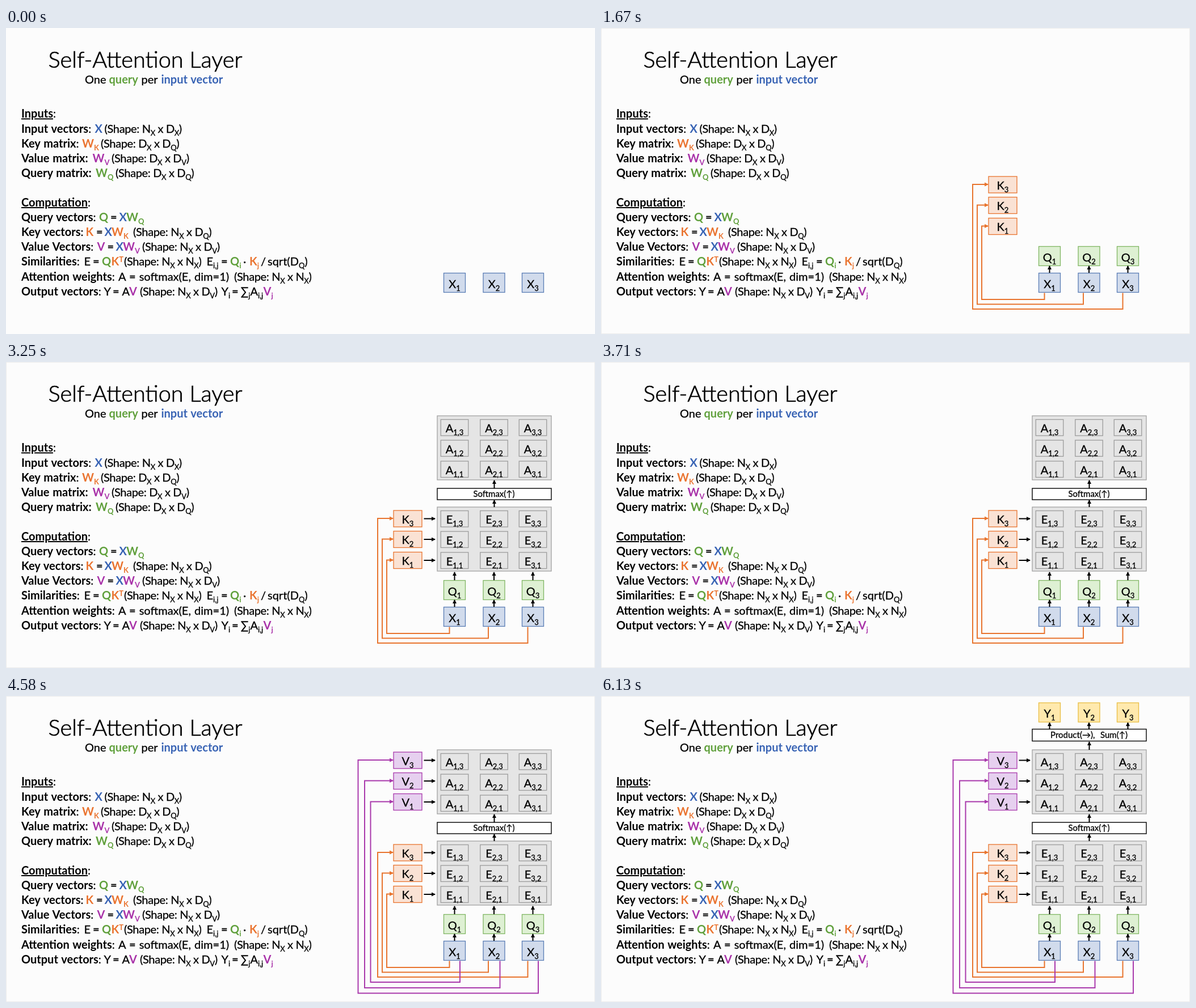
These frames come from a looping animation (1038 by 540 pixels, 6170 ms). An HTML page:

```html
<!DOCTYPE html>
<html lang="en">
<head>
<meta charset="utf-8">
<title>Self-Attention Layer</title>
<style>
html, body { margin: 0; width: 100%; height: 100%; overflow: hidden; background: #fcfcfc; }
svg { display: block; width: 1038px; height: 540px; }
text { font: 20px Lato, "Open Sans", sans-serif; word-spacing: 1px; white-space: pre; stroke: #000; stroke-width: .3px; }
.title { font-size: 39.7px; font-weight: 300; word-spacing: 0; stroke-width: .7px; }
.mid { text-anchor: middle; }
.small { font-size: 15px; }
.tight { letter-spacing: -.35px; word-spacing: 0; }
.k, .u, .b, .g, .o, .p { font-weight: 700; stroke: none; }
.u { text-decoration: underline; }
.b { fill: #3863b4; }
.g { fill: #60a03c; }
.o { fill: #ea7430; }
.p { fill: #a932a9; }
.sub { font-size: 13px; baseline-shift: -5px; }
.sup { font-size: 13px; baseline-shift: 6px; }
</style>
</head>
<body>
<svg id="stage" viewBox="0 0 1038 540"></svg>
<script>
const LOOP = 6170;
const STARTS = [0, 500, 1400, 2300, 3200, 4100, 5000];
const ORANGE = '#e8742e', PURPLE = '#a939ac';
const cols = [790.5, 860, 928.5];

// _x is a subscript, ^x a superscript, [c text] a run of class c
const rich = s => s
  .replace(/_(\w(?:,\w)?)/g, '<tspan class="sub">$1</tspan>')
  .replace(/\^(\w)/g, '<tspan class="sup">$1</tspan>')
  .replace(/\[(\w+) ([^\]]*)\]/g, '<tspan class="$1">$2</tspan>');

const text = (x, y, s, cls = '') => `<text x="${x}" y="${y}" class="${cls}">${rich(s)}</text>`;

// "@x run@x run" places each run at its own x on one baseline
const line = (y, s) => s.split('@').slice(1).map(run => {
  const gap = run.indexOf(' ');
  return text(run.slice(0, gap), y, run.slice(gap + 1));
}).join('');

const rect = (x, y, w, h, fill, stroke, width = 1.3) =>
  `<rect x="${x}" y="${y}" width="${w}" height="${h}" fill="${fill}" stroke="${stroke}" stroke-width="${width}"/>`;

const box = (cx, y, w, h, fill, stroke, label, base) =>
  rect(cx - w / 2, y, w, h, fill, stroke) + text(cx, base, label, 'mid');

const arrow = (d, color = '#000') => {
  const id = { '#000': 'black', [ORANGE]: 'orange', [PURPLE]: 'purple' }[color];
  return `<path d="${d}" fill="none" stroke="${color}" stroke-width="2" marker-end="url(#${id})"/>`;
};

const marker = (id, color) =>
  `<marker id="${id}" markerUnits="userSpaceOnUse" markerWidth="7" markerHeight="8" refX="6" refY="4" orient="auto">
   <path d="M0 .5L7 4L0 7.5Z" fill="${color}"/></marker>`;

const row = (name, y, fill, stroke) =>
  cols.map((x, i) => box(x, y, 38, 34, fill, stroke, `${name}_${i + 1}`, y + 26)).join('');

const upArrows = (from, to) => cols.map(x => arrow(`M${x} ${from}V${to}`)).join('');

const rowTop = (top, j) => top + [80, 43, 6.5][j];

const grid = (name, top) => rect(760, top, 201, 113, '#e5e5e5', '#a2a2a2') +
  cols.map((x, i) => [0, 1, 2].map(j => {
    const y = rowTop(top, j);
    return box(x, y, 48.5, 28.5, '#e5e5e5', '#9c9c9c', `${name}_${i + 1},${j + 1}`, y + 22.5);
  }).join('')).join('');

const inArrows = top => [0, 1, 2].map(j => arrow(`M736.5 ${rowTop(top, j) + 14}H756`)).join('');

const bar = (y, h, label) =>
  rect(760, y, 201, h, '#fff', '#111', 1.5) + text(860, y + h / 2 + 5, label, 'mid small');

// boxes on the left, fed by elbow lines from the inputs: [start x, bottom y, left x]
const feeds = (name, top, fill, color, routes) => routes.map(([x, bottom, left], j) => {
  const y = rowTop(top, j) - .5;
  return arrow(`M${x} 467.5V${bottom}H${left}V${y + 14}H682`, color) +
    box(708, y, 50, 29, fill, color, `${name}_${j + 1}`, y + 22.5);
}).join('');

const shape = (a, b) => `[tight (Shape: ${a} x ${b})]`;
const lines = [
  '@27 [u Inputs]:',
  '@27 [k Input vectors]:@156.5 [b X]@173.5 ' + shape('N_X', 'D_X'),
  '@27 [k Key matrix]:@134 [o W_K]@167 ' + shape('D_X', 'D_Q'),
  '@27 [k Value matrix:]@152.5 [p W_V]@186 ' + shape('D_X', 'D_V'),
  '@27 [k Query matrix:]@158 [g W_Q]@193 ' + shape('D_X', 'D_Q'),
  '',
  '@27 [u Computation]:',
  '@27 [k Query vectors]:@164 [g Q]@184 =@199.5 [b X]@212 [g W_Q]',
  '@27 [k Key vectors]:@140.5 [o K]@159 =@173.5 [b X]@186 [o W_K]@224 ' + shape('N_X', 'D_Q'),
  '@27 [k Value Vectors]:@160.5 [p V]@178.5 =@193.5 [b X]@206 [p W_V]@240 ' + shape('N_X', 'D_V'),
  '@27 [k Similarities]:@137.5 E@153 =@169 [g Q]@185.5 [o K^T]@208 ' + shape('N_X', 'N_X') +
    '@353.5 E_i,j@379 =@395 [g Q_i]@418 ·@429 [o K_j]@449 /@461 sqrt(D_Q)',
  '@27 [k Attention weights]:@198 A = softmax(E, dim=1)@402 ' + shape('N_X', 'N_X'),
  '@27 [k Output vectors]:@172.5 Y@188 =@204.5 A@217 [p V]@236 ' + shape('N_X', 'D_V') +
    '@379.5 Y_i@398 =@413.5 ∑_j@430.5 A_i,j@453.5 [p V_j]'
];

const stages = [
  text(74.5, 69.5, 'Self-Attention Layer', 'title') +
    line(97.5, '@139 One@181.5 [g query]@238.5 per@273.5 [b input vector]') +
    lines.map((s, i) => line(158.4 + 26.1 * i, s)).join('') +
    row('X', 432.5, '#d1dbec', '#5a7db5'),
  rect(.5, .5, 1037, 539, 'none', '#ececec', 1) +
    row('Q', 385.5, '#def0d3', '#80b663') + upArrows(432, 420),
  feeds('K', 256, '#fae2d4', ORANGE, [[781.5, 479, 671], [850, 487.5, 663], [919.5, 496, 655]]),
  grid('E', 256) + inArrows(256) + upArrows(385, 371),
  grid('A', 95) + bar(223, 20, 'Softmax(↑)') + arrow('M860.5 256V244') + arrow('M860.5 223V209'),
  feeds('V', 93, '#e6d0ef', PURPLE, [[800, 505, 642.5], [870.5, 515, 632], [938, 524.5, 620.5]]) +
    inArrows(93),
  bar(58.5, 21, 'Product(→),  Sum(↑)') + arrow('M860.5 95V81') + upArrows(58, 47) +
    row('Y', 12, '#ffe9ad', '#e9bd43')
];

const stage = document.getElementById('stage');
stage.innerHTML = '<defs>' + marker('black', '#000') + marker('orange', ORANGE) +
  marker('purple', PURPLE) + '</defs>' + stages.map(s => `<g>${s}</g>`).join('');
const groups = stage.querySelectorAll(':scope > g');

function frame() {
  const t = performance.now() % LOOP;
  groups.forEach((g, i) => g.style.display = t >= STARTS[i] ? '' : 'none');
  requestAnimationFrame(frame);
}
frame();
</script>
</body>
</html>
```
